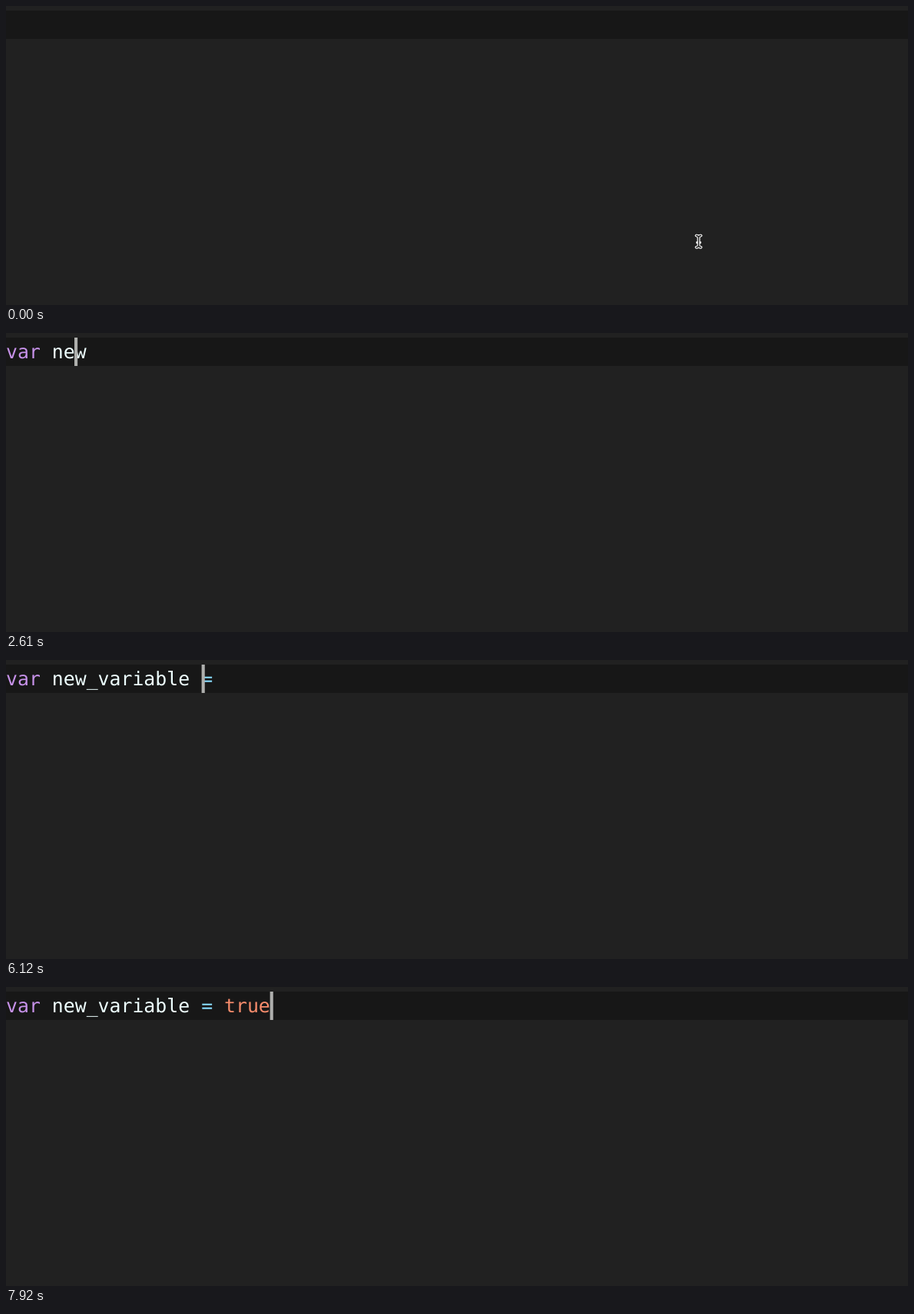
An HTML page for the animation above (8000 ms loop, 1174 px wide and 390 px high).

```html
<!DOCTYPE html>
<html lang="en">
<head>
<meta charset="utf-8">
<title>Typing with suggestions</title>
<style>
html, body { margin: 0; width: 100%; height: 100%; overflow: hidden; background: #212121; }
svg { display: block; width: 1174px; height: 390px; }
text {
  font: 24.84px "DejaVu Sans Mono", monospace;
  fill: #eff;
  white-space: pre;
  text-rendering: geometricPrecision;
}
.keyword { fill: #c792ea; }
.operator { fill: #89ddff; }
.literal { fill: #f78c6c; }
.match { fill: #18a3ff; font-weight: bold; }
.icon { fill: none; stroke-linejoin: round; }
</style>
</head>
<body>
<svg viewBox="0 0 1174 390">
  <rect width="1174" height="390" fill="#212121"/>
  <rect y="6" width="1174" height="37" fill="#171717"/>
  <g id="pointer" fill="none" stroke-linecap="round">
    <path id="beam" d="M898.5 299.5Q901.5 299.5 901.5 302.5V312Q901.5 314.7 898.5 314.7M904.5 299.5Q901.5 299.5 901.5 302.5M901.5 312Q901.5 314.7 904.5 314.7M900 308.5H903" stroke="#eee" stroke-width="3.6"/>
    <use href="#beam" style="stroke:#222"/>
    <path d="M898.5 299.5Q901.5 299.5 901.5 302.5V312Q901.5 314.7 898.5 314.7M904.5 299.5Q901.5 299.5 901.5 302.5M901.5 312Q901.5 314.7 904.5 314.7" stroke="#222" stroke-width="1.4"/>
  </g>
  <text id="code" y="33.2"></text>
  <rect id="caret" y="6" width="4.14" height="37" fill="#aeafad"/>
  <g id="popup"></g>
</svg>
<script>
const LOOP = 8000, STEP = 30, SCALE = 2.07, ADVANCE = 7.2238;
const ROW = 18 * SCALE, POPUP_TOP = 43.3, POPUP_WIDTH = 433 * SCALE;

const SOURCE = 'var new_variable = true';
const KEY_TIMES = [1170, 1560, 1620, 2070, 2340, 2580, 2610, 3030, 4320, 4590, 4920, 5070,
  5160, 5310, 5490, 5610, 6030, 6120, 6210, 6630, 7170, 7260, 7350];
const JUMPS = [2580, 4590, 5070]; // keys after which the caret moves at once

// [time, caret column, typed prefix, suggestions]
const POPUPS = [
  [1200, 1, 'v', 'var'], [1590, 2, 'va', 'var'], [1650, 3, 'var', 'var'], [2070],
  [2400, 5, 'n', 'new'], [2580, 6, 'ne', 'new'], [2610],
  [6660, 20, 't', 'te time totalgp totaltime true Type()'],
  [7200, 21, 'tr', 'true'], [7290, 22, 'tru', 'true'], [7380, 23, 'true', 'true'], [7890]
];

const FIELD = 'M9 2.4 14.3 5.1 14.5 5.5V10L14.2 10.4 7 13.7 1.7 11 1.5 10.7V6.4L1.8 6ZM1.6 6.3 6.95 8.75 14.4 5.3M6.95 8.75V13.6';
const METHOD = 'M8 1.6 13.8 4.7V11.2L8 14.4 2.2 11.2V4.7ZM2.2 4.7 8 7.9 13.8 4.7M8 7.9V14.4';

const $ = id => document.getElementById(id);
const column = n => Math.round(n * ADVANCE) * SCALE;
const span = (kind, text) => `<tspan class="${kind}">${text}</tspan>`;

function codeMarkup(typed) {
  return typed.replace(/\b(var|true)\b|=/g, word =>
    span({ var: 'keyword', true: 'literal', '=': 'operator' }[word], word));
}

function rowMarkup(label, i, left, prefix) {
  const top = POPUP_TOP + SCALE + i * ROW;
  const method = label.endsWith('()');
  const color = i === 0 ? '#fff' : method ? '#b180d7' : '#75beff';
  const n = prefix.length;
  const selected = i ? '' :
    `<rect x="${left + SCALE}" y="${top}" width="${POPUP_WIDTH - 2 * SCALE}" height="${ROW}" fill="#094771"/>`;
  return `${selected}
    <path class="icon" d="${method ? METHOD : FIELD}" stroke="${color}"
      transform="translate(${left + 6.4} ${top + 2.2}) scale(${SCALE})"/>
    <text x="${left + 47.8}" y="${top + 27.2}">${span('match', label.slice(0, n))}${label.slice(n)}</text>`;
}

function popupMarkup([, col, prefix, list]) {
  if (!list) return '';
  const left = Math.min(column(col), 1174 - POPUP_WIDTH);
  const labels = list.split(' ');
  const height = labels.length * ROW + 4 * SCALE;
  return `<rect x="${left + SCALE / 2}" y="${POPUP_TOP + SCALE / 2}" width="${POPUP_WIDTH - SCALE}"
      height="${height - SCALE}" fill="#212121" stroke="#454545" stroke-width="${SCALE}"/>`
    + labels.map((label, i) => rowMarkup(label, i, left, prefix)).join('');
}

function caretX(t, count) {
  if (!count) return 0;
  const start = KEY_TIMES[count - 1];
  const u = JUMPS.includes(start) ? 1 : Math.min(1, (t - start) / 60);
  const from = column(count - 1);
  return from + (column(count) - from) * (1 - (1 - u) ** 3);
}

function caretOpacity(t, count) {
  if (!count && t < 540) return 0;
  const last = t >= 7890 ? 7890 : count ? KEY_TIMES[count - 1] : -540;
  const idle = t - last - 540;
  if (idle < 0) return 1;
  const q = idle % 1080;
  if (q < 540) return Math.max(0, 1 - q / 120);
  return Math.min(1, (q - 540) / 120);
}

let shown = -1;
function draw() {
  const t = Math.floor(performance.now() % LOOP / STEP) * STEP;
  if (t !== shown) {
    shown = t;
    const count = KEY_TIMES.filter(k => k <= t).length;
    $('code').innerHTML = codeMarkup(SOURCE.slice(0, count));
    $('caret').setAttribute('x', caretX(t, count));
    $('caret').setAttribute('opacity', caretOpacity(t, count));
    $('pointer').setAttribute('visibility', count ? 'hidden' : 'visible');
    $('popup').innerHTML = popupMarkup(POPUPS.filter(p => p[0] <= t).pop() || []);
  }
  requestAnimationFrame(draw);
}
draw();
</script>
</body>
</html>
```
